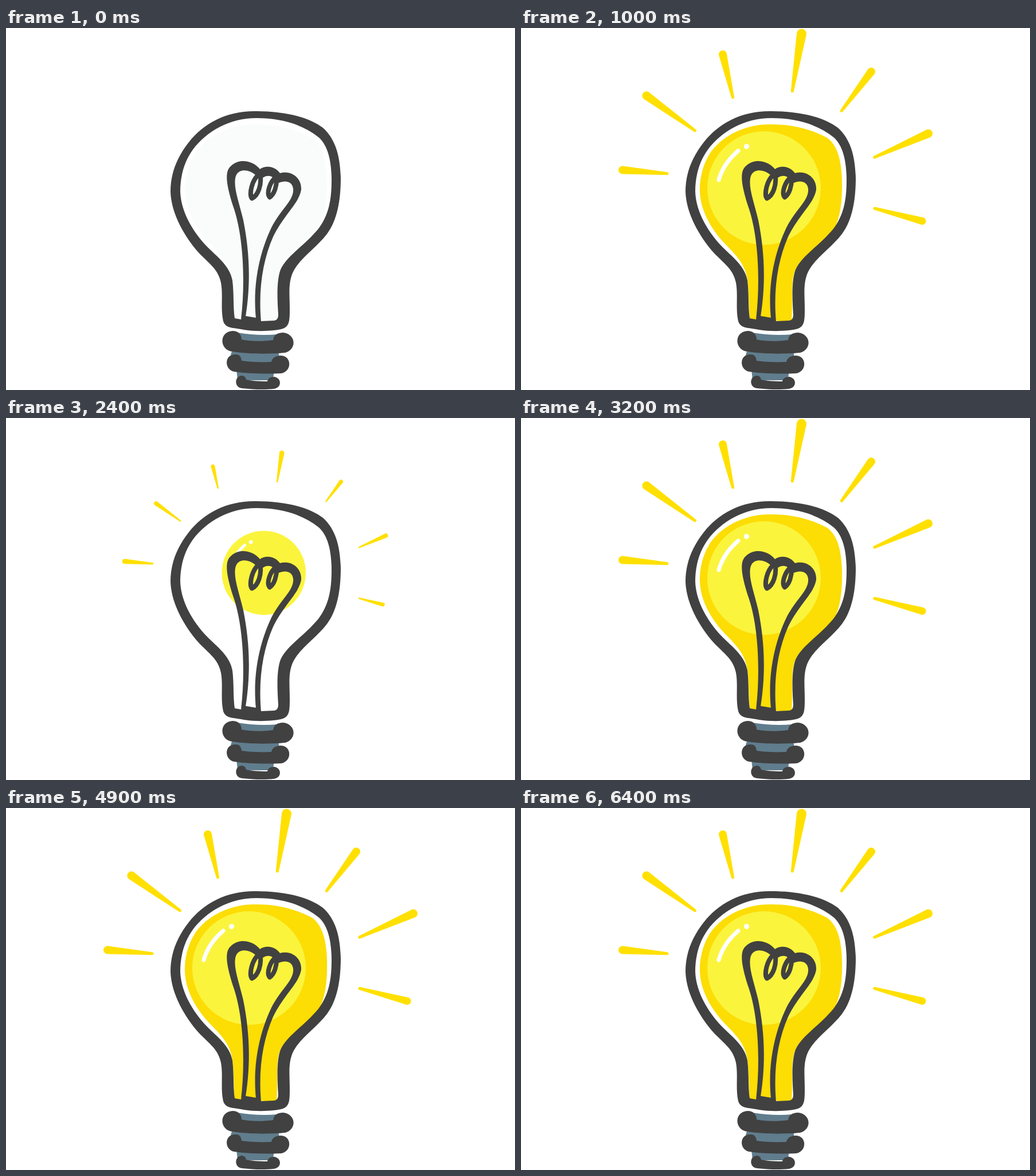
Recreate the animation shown at these times as an HTML page. Size 888 px wide and 631 px high, loop 6.61 s.

```html
<!DOCTYPE html>
<html lang="en">
<head>
<meta charset="utf-8">
<title>Light bulb</title>
<style>
html, body { margin: 0; height: 100%; overflow: hidden; background: #fff; }
svg { display: block; width: 100vw; height: 100vh; }
</style>
</head>
<body>
<svg viewBox="0 0 888 631">
  <g id="rays" fill="#ffe000"></g>
  <path id="glass" d="M437 168C395 167 355 185 332 215C318 235 311 262 312 285C313 315 328 345 352 372C371 392 392 410 395 440C398 465 397 485 399 508L472 512C475 470 470 440 479 421C490 397 522 382 545 352C557 333 561 300 560 265C559 230 552 205 535 192C508 177 475 168 437 168Z"/>
  <g id="glow">
    <circle cx="424" cy="279" r="99" fill="#fbf43d"/>
    <path d="M345 265Q353 236 379 214" fill="none" stroke="#fff" stroke-width="7" stroke-linecap="round"/>
    <circle cx="393.5" cy="206.5" r="4.5" fill="#fff"/>
  </g>
  <path fill="#607d8d" d="M404 531Q440 537 473 534L477 580 468 592 466 614H404L402 595 392 570Z"/>
  <g fill="#414141">
    <!-- glass outline -->
    <path fill-rule="evenodd" d="M437 145C385 144 345 166 319 199C297 227 287 255 287 285C288 318 305 354 332 387C350 408 370 418 375 444C379 465 374 490 379 511C383 524 396 522 415 526C440 530 470 528 483 524C495 520 495 508 495 490C495 465 492 446 500 427C512 401 540 385 560 359C578 335 584 300 584 262C583 225 576 195 553 174C525 153 480 145 437 145ZM437 157C390 157 350 180 326 212C310 234 304 260 304 285C305 315 320 346 345 375C365 397 390 412 395 440C398 465 396 485 399 506L410 508 418 502 436 505 445 511 468 510Q475 509 475 500C473 470 472 440 479 421C490 397 520 380 545 350C563 326 568 300 568 265C568 235 563 207 546 191C518 168 480 157 437 157Z"/>
    <!-- filament -->
    <path d="M410 508C418 440 414 360 396 310C385 275 380 250 393 240C408 226 432 232 443 246C455 238 470 242 478 253C497 248 516 260 515 282C511 306 485 325 466 364C448 405 440 455 445 512L436 506C430 445 443 390 463 348C480 315 503 300 501 280C499 265 484 266 476 270L468 262Q458 254 448 261L436 257C425 246 403 243 400 262C397 280 407 305 414 335C424 385 428 440 418 503Z"/>
    <path fill="none" stroke="#414141" stroke-width="8" stroke-linejoin="round" d="M443 254C447 272 440 292 429 297C424 291 428 264 443 254M472 260C473 275 468 290 460 295C454 288 460 268 472 259"/>
    <!-- screw base -->
    <path d="M395 528C370 530 373 563 396 564C425 569 465 568 487 566C508 560 506 534 484 531C472 531 467 536 466 544C445 547 425 546 411 543C411 534 405 528 395 528Z"/>
    <path d="M400 569C380 569 381 596 398 599C425 603 455 603 480 602C499 599 499 572 480 571C469 571 464 576 463 582C445 583 425 582 411 580C410 572 407 569 400 569Z"/>
    <path d="M411 606C398 607 398 627 412 628C430 630 450 631 467 629C482 627 481 610 468 608C460 608 457 611 456 616C440 616 428 615 419 613C418 608 415 606 411 606Z"/>
  </g>
</svg>
<script>
const LOOP = 6610, CYCLE = 2200;
const $ = id => document.getElementById(id);

// tip x, tip y, round end x, round end y, end radius, share of the shrinking
const rays = [
  [257, 254, 177, 247.5, 7, .75],
  [305, 180, 219, 118, 7.5, 1],
  [370, 123, 352, 46, 7, 1],
  [473, 112, 489.5, 10, 8.5, 1],
  [558, 146, 611, 76, 7, 1],
  [615, 226, 710.5, 184, 7.5, 1],
  [615, 314, 700, 336.5, 6.5, 1]
].map(([x, y, ex, ey, r, share]) => {
  const el = document.createElementNS("http://www.w3.org/2000/svg", "path");
  const len = Math.hypot(ex - x, ey - y);
  const angle = Math.atan2(ey - y, ex - x) * 180 / Math.PI;
  el.setAttribute("d", `M2 -2.5L${len} ${-r}A${r} ${r} 0 0 1 ${len} ${r}L2 2.5A2.5 2.5 0 0 1 2 -2.5Z`);
  $("rays").append(el);
  return { el, share, place: `translate(${x} ${y}) rotate(${angle})` };
});

const scaleAt = (x, y, s) => `translate(${x} ${y}) scale(${s}) translate(${-x} ${-y})`;

// ray length, glow size and glass size for each 100 ms step while lighting up
const warmUp = [[0, 0, 1], [.25, .5, 0], [.5, .74, 0], [.75, .87, 0], [1, 1, .9]];

function pose(p) {
  if (p < 500) return warmUp[Math.floor(p / 100)];
  const dimmed = (p - 500) % 500 >= 300;
  return [dimmed ? .75 : 1, 1, 1];
}

function draw(now) {
  const p = Math.min(now % LOOP, 3 * CYCLE - 1) % CYCLE;
  const [ray, glow, glass] = pose(p);
  for (const { el, share, place } of rays) {
    const s = ray && 1 - (1 - ray) * share;
    el.setAttribute("transform", `${place} scale(${s})`);
  }
  $("glow").setAttribute("transform", scaleAt(523, 244, glow));
  $("glass").setAttribute("transform", scaleAt(435, 510, glass));
  $("glass").setAttribute("fill", p < 100 ? "#fafcfc" : "#fcdd04");
}

let start;
function tick(now) {
  start ??= now;
  draw(now - start);
  requestAnimationFrame(tick);
}
draw(0);
requestAnimationFrame(tick);
</script>
</body>
</html>
```
